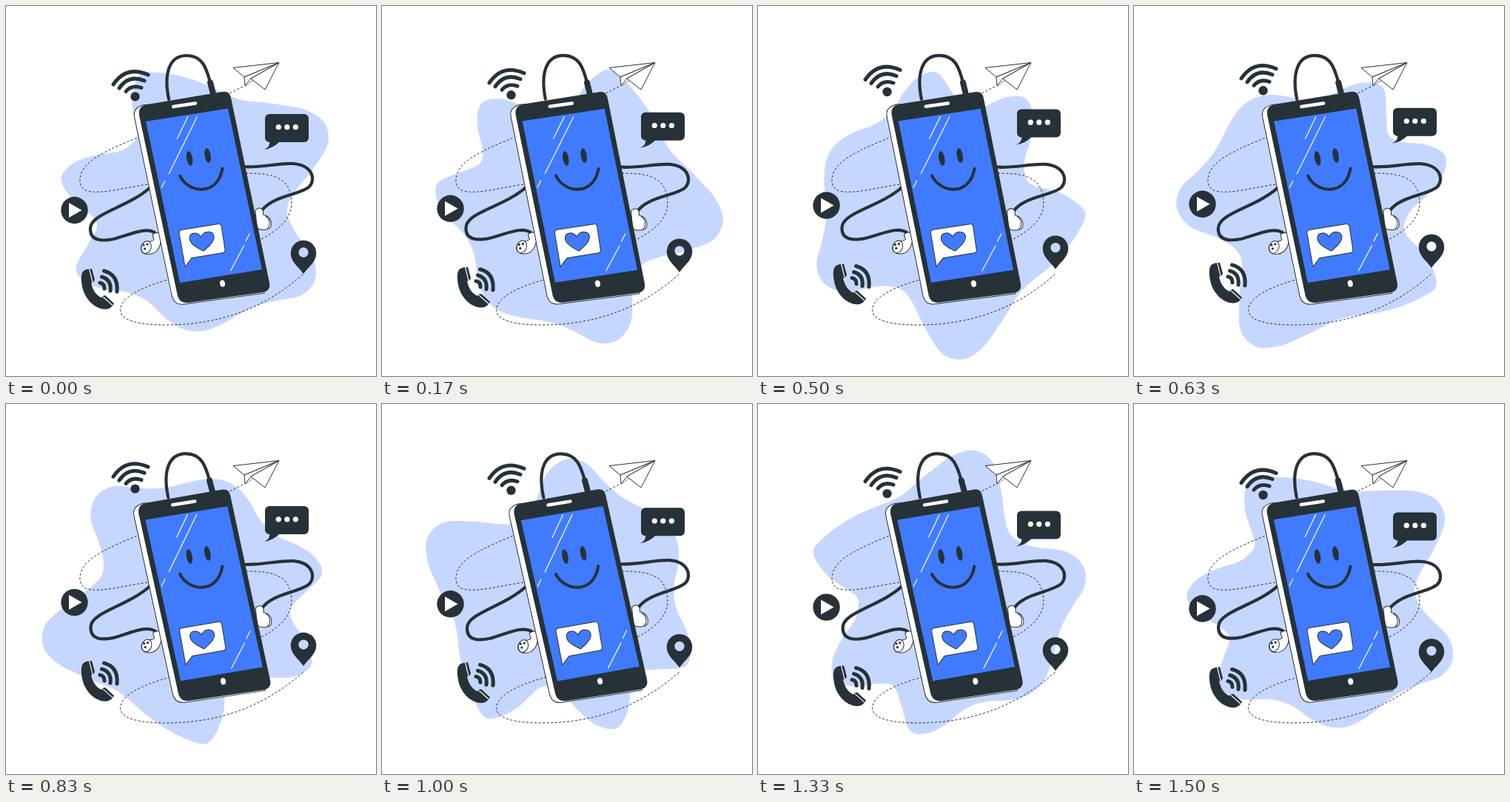
An HTML page for the animation above (1.54 s loop, 500 px wide and 500 px high).

```html
<!DOCTYPE html>
<html lang="en">
<head>
<meta charset="utf-8">
<title>Happy phone</title>
<style>
  html, body { margin: 0; width: 100%; height: 100%; overflow: hidden; background: #fff; }
  svg { display: block; width: 100%; height: 100%; }
  .dark { fill: #263238; }
  .blue { fill: #407bff; }
  .white { fill: #fff; }
  .line { fill: none; stroke: #263238; stroke-linecap: round; stroke-linejoin: round; }
  .thin { stroke: #263238; stroke-width: 1; stroke-linejoin: round; }
  .shine { fill: none; stroke: #fff; stroke-width: 1.2; }
</style>
</head>
<body>
<svg viewBox="0 0 500 500">
  <path id="blob" fill="#c6d7ff"/>

  <path class="line" stroke-dasharray="3 2.5" style="stroke-linecap:butt" d="M320 109L300 119C260 140 220 160 180 177C150 189 118 203 107 217C97 230 97 246 110 250C130 255 165 244 193 241C240 233 290 226 327 226C360 226 378 232 384 252C390 275 383 295 345 315C310 335 260 358 222 369C190 378 160 390 155 407C150 425 180 431 215 431C290 431 350 408 402 362"/>

  <g class="white thin">
    <path d="M307 83.5L369 76.5L322 96Z"/>
    <path d="M322 96L323 108L369 76.5Z"/>
    <path d="M323 108L331 98L369 76.5"/>
    <path d="M369 76.5L331 98L350 113Z"/>
  </g>

  <g id="icons">
    <g class="line" stroke-width="5">
      <path d="M145 106Q163 80 192 93"/>
      <path d="M153 111Q166 92 187 101"/>
      <path d="M162 115.5Q170 106 183 110.5"/>
    </g>
    <circle class="dark" cx="174.5" cy="122.5" r="6.2"/>

    <rect class="dark" x="350" y="146" width="59" height="38" rx="6"/>
    <path class="dark" d="M356 181Q358 190 349 194Q362 192 371 182Z"/>
    <g class="white">
      <circle cx="368.3" cy="163.7" r="3.6"/>
      <circle cx="379.8" cy="163.7" r="3.6"/>
      <circle cx="391.4" cy="163.7" r="3.6"/>
    </g>

    <circle class="dark" cx="92.5" cy="276" r="18.2"/>
    <path class="white" d="M85 266V286L102.5 276Z"/>

    <path class="dark" fill-rule="evenodd" d="M402 362C395 352 384.7 346 384.7 334A17.3 17.3 0 0 1 419.3 334C419.3 346 409 352 402 362ZM395.4 333a6.6 6.6 0 1 0 13.2 0a6.6 6.6 0 1 0 -13.2 0Z"/>

    <path class="dark" d="M106 357Q110 355 116 355L120 370Q119 373 115 374C117 384 122 391 129 394Q131 391 134 391L146 402Q143 408 137 409.5C123 412 106 397 103 379C101 369 101 360 106 357Z"/>
    <path class="shine" d="M112.5 355L117 373M131 393L144 404.5"/>
    <g class="line" stroke-width="5">
      <path d="M132.5 358Q152 363 150 386"/>
      <path d="M129.5 366Q143 370 141 385"/>
      <path d="M127 374Q133 375 133 382"/>
    </g>
  </g>

  <g id="phone">
    <g class="line" stroke-width="4.2">
      <path d="M220 126C213 92 220 67 244 67C266 67 271 85 276 103"/>
      <path d="M320 217C345 219 368 212 388 213C414 215 419 234 410 244C399 255 361 256 346 276"/>
      <path d="M194 246C165 272 115 280 114 300C113 318 130 318 145 315C170 308 190 298 202 307"/>
      <path stroke-width="8" d="M276 103.5L279.5 117"/>
    </g>

    <g class="white thin">
      <path d="M198 309C204 304 210 306 209.5 314C209 327 203 335 193 335.5C184 336 181 330 183 324C186 317 196 320 200 316Z"/>
      <ellipse cx="189.5" cy="326" rx="6.5" ry="8.5" transform="rotate(20 189.5 326)"/>
      <path d="M337 276C343 270 349 274 347.5 282C355 283 360 290 358 298C355 304 343 303 339 300Z"/>
      <path fill="none" d="M350 283.5C357 287 358 296 353 301"/>
    </g>
    <g class="dark">
      <circle cx="186" cy="323" r="1.6"/>
      <circle cx="187.5" cy="328" r="1.6"/>
      <circle cx="191" cy="322" r="1.6"/>
    </g>

    <path class="white thin" d="M187 133.5Q171 137 173.5 150L224 391Q227 404.5 240 403L349 388L300 130Z"/>
    <path class="dark" d="M191 133L292 116Q302 114 304 124L356 374Q358 385 347 387L246 401Q235 402 232 392L180 148Q178 135 191 133Z"/>
    <path class="blue" d="M189 156L300 138.5L346 356L235 374Z"/>
    <path class="shine" style="stroke-width:4.5;stroke-linecap:round" d="M226 136L256 131.5"/>
    <ellipse class="white" cx="292.5" cy="375" rx="3.5" ry="4.5" transform="rotate(-10 292.5 375)"/>

    <ellipse class="dark" cx="248" cy="206" rx="4" ry="10" transform="rotate(-10 248 206)"/>
    <ellipse class="dark" cx="272.5" cy="202" rx="4" ry="10" transform="rotate(-10 272.5 202)"/>
    <path class="line" stroke-width="4" d="M235 229.5C246 253 286 258 292.5 219.5"/>
    <path class="shine" d="M246 149L231 180M258.5 149L220 227M215 236L210 246M329.5 307L324 318M322 323L303.5 358"/>

    <path class="white thin" d="M237 302.5L287 294.5Q290 294 291 297L296 329Q296.5 333 293 333.5L251 340.5L242 352.5L234 307Q233.5 303 237 302.5Z"/>
    <path class="blue thin" d="M267 331C256 326 248 320 248 314C248 306 258 304 264 312C267 303 279 303 281 311C282 318 274 325 267 331Z"/>
  </g>
</svg>
<script>
const LOOP = 1540, LEAD = 50;
const CENTER = [252, 269];
// Blob radius at equal angle steps, clockwise from the right
const RADII = [
  129, 131, 146, 178, 194, 191, 174, 163, 160, 163, 168, 171, 167, 157, 146,
  143, 148, 163, 177, 179, 150, 132, 140, 165, 181, 170, 146, 124, 117, 121,
  161, 190, 185, 176, 168, 161, 156, 157, 167, 181, 199, 210, 201, 169, 142
];
const [blob, icons, phone] = ['blob', 'icons', 'phone'].map(id => document.getElementById(id));

function smoothClosedPath(points) {
  const n = points.length;
  const at = i => points[(i + n) % n];
  const handle = (i, sign) => at(i).map((v, k) => v + sign * (at(i + 1)[k] - at(i - 1)[k]) / 6);
  return 'M' + points[0] + points.map((_, i) =>
    `C${handle(i, 1)} ${handle(i + 1, -1)} ${at(i + 1)}`).join('') + 'Z';
}

blob.setAttribute('d', smoothClosedPath(RADII.map((r, i) => {
  const a = i / RADII.length * 2 * Math.PI;
  return [CENTER[0] + r * Math.cos(a), CENTER[1] + r * Math.sin(a)];
})));

function draw(now) {
  const turn = now % LOOP / LOOP;
  const p = (turn + LEAD / LOOP) % 1;
  const spin = 360 * turn - 3 * Math.sin(2 * Math.PI * p);
  const lift = 10 * (1 - Math.abs(2 * p - 1));
  const sway = 1 - 4 * Math.abs((p + 0.25) % 1 - 0.5);
  blob.setAttribute('transform', `rotate(${spin} ${CENTER})`);
  icons.setAttribute('transform', `translate(0 ${0.65 - lift})`);
  phone.setAttribute('transform', `rotate(${sway - 0.13} 263.5 235)`);
  requestAnimationFrame(draw);
}
draw(performance.now());
</script>
</body>
</html>
```
